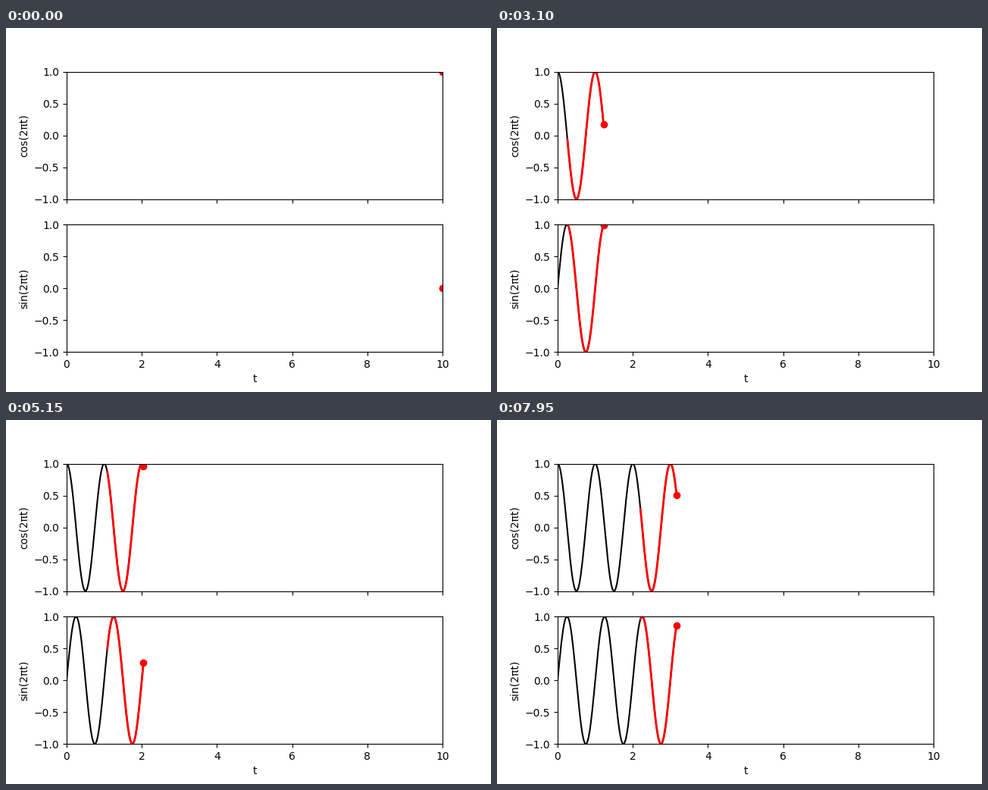
Recreate the animation shown at these times as a matplotlib script. Size 640 by 480 pixels, loop 8 s.

```python
import matplotlib.pyplot as plt
import numpy as np
from matplotlib.animation import FuncAnimation

FRAMES = 160
INTERVAL = 50  # ms
TAIL = 1.0     # length of the red trail, in units of t

t = np.linspace(0, 10, 500)
fig, axes = plt.subplots(2, 1, sharex=True, figsize=(6.4, 4.8), dpi=100)


def make_panel(ax, func, label):
    ax.set_ylabel(label)
    ax.set_xlim(0, 10)
    ax.set_ylim(-1, 1)
    path, = ax.plot([], [], color="black", lw=1.5)
    trail, = ax.plot([], [], color="red", lw=2)
    head, = ax.plot([], [], color="red", marker="o", markeredgecolor="r")
    return func(2 * np.pi * t), path, trail, head


panels = [
    make_panel(axes[0], np.cos, "cos(2πt)"),
    make_panel(axes[1], np.sin, "sin(2πt)"),
]
axes[1].set_xlabel("t")


def update(i):
    last = i - 1  # wraps to the final sample when i is 0
    recent = (t > t[i] - TAIL) & (t < t[i])
    artists = []
    for y, path, trail, head in panels:
        path.set_data(t[:i], y[:i])
        trail.set_data(t[recent], y[recent])
        head.set_data([t[last]], [y[last]])
        artists += [path, trail, head]
    return artists


anim = FuncAnimation(fig, update, frames=FRAMES, interval=INTERVAL,
                     repeat=True, repeat_delay=0, blit=False)
plt.show()
```
